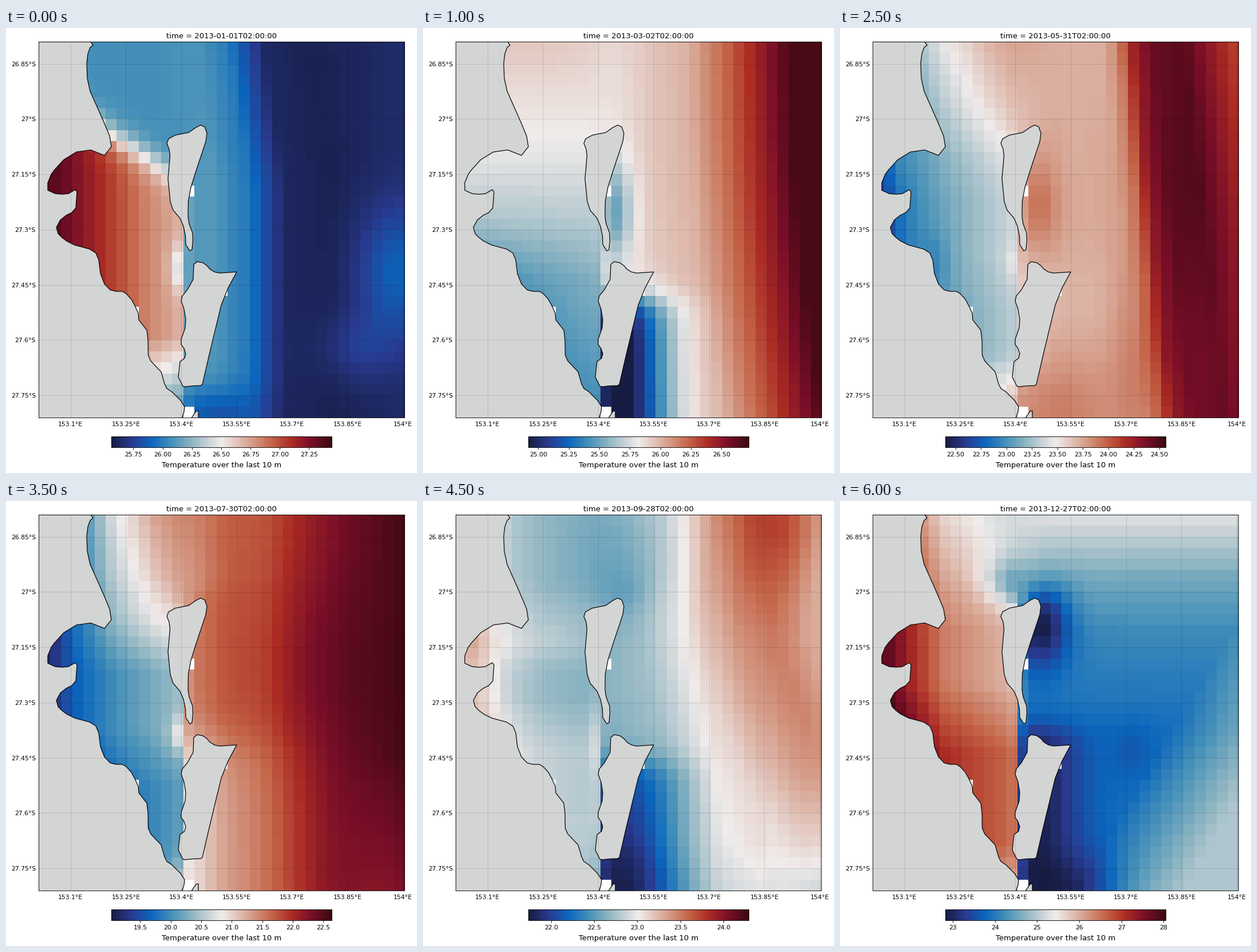
Recreate the animation shown at these times as a matplotlib script. Size 718 px wide and 779 px high, loop 6.5 s.

```python
import numpy as np
import matplotlib.pyplot as plt
from matplotlib.animation import FuncAnimation
from matplotlib.colors import LinearSegmentedColormap
from matplotlib.patches import Polygon
from matplotlib.ticker import MaxNLocator, ScalarFormatter

W, H, DPI = 718, 779, 100
LEFT, RIGHT, TOP, BOTTOM = 57.5, 696, 24.4, 682.4
COLS, ROWS = 33, 34
STEPS, STEP_MS = 13, 500
PX = 72 / DPI  # points per pixel

plt.rcParams["font.family"] = "DejaVu Sans"

# Diverging blue-white-red colours
STOPS = ["#171c42", "#293a8f", "#0b66bd", "#4590b9", "#8eb5c2", "#d2d8db",
         "#e6d2cc", "#d59d89", "#c46548", "#ac2b24", "#780e28", "#3c0911"]
stops = [(i / 11, c) for i, c in enumerate(STOPS)]
stops.insert(6, (0.5, "#f0eceb"))
BALANCE = LinearSegmentedColormap.from_list("balance", stops)

# Cell centres in pixels
X, Y = np.meshgrid(LEFT + (np.arange(COLS) + 0.5) * (RIGHT - LEFT) / COLS,
                   TOP + (np.arange(ROWS) + 0.5) * (BOTTOM - TOP) / ROWS)


def ramp(s, *points):
    return np.interp(s, *zip(*points))


def rise(s, middle, width):
    """Smooth step from 0 to 1; a negative width falls instead."""
    return 1 / (1 + np.exp(-np.clip((s - middle) / width, -50, 50)))


def blob(x, y, rx, ry):
    return np.exp(-((X - x) / rx) ** 2 - ((Y - y) / ry) ** 2)


def upwelling(start, width):
    """Cold water along the outer coast of the southern island."""
    return rise(Y, start, 15) * np.exp(-((X - 340) / width) ** 2)


# Each function returns the bay and the open sea in percent of the range.

def january():
    warm = ramp(X, (90, 95), (200, 76), (250, 67), (310, 60))
    front = rise(Y - 0.6 * (X - 185), 192, 15)
    bay = (27 + (warm - 27) * front - 14 * blob(305, 420, 20, 40)
           - ramp(Y, (540, 0), (680, 35)))
    s = X - ramp(Y, (30, 0), (280, 35))
    sea = ramp(s, (330, 29), (390, 22), (425, 11), (450, 4), (530, 2), (690, 5))
    sea += (13 * blob(680, 430, 70, 120) + 6 * blob(610, 560, 60, 60)
            - 14 * blob(360, 680, 70, 50))
    return bay, sea


def march():
    bay = ramp(Y, (35, 56), (230, 48), (330, 42), (440, 33), (660, 25))
    bay += 0.05 * (X - 250) * rise(Y, 380, 30)
    s = X - 60 * (Y / 680) ** 2
    sea = ramp(s, (330, 52), (400, 57), (460, 60), (530, 73), (600, 88), (640, 98))
    sea -= 54 * upwelling(475, 90) + 20 * blob(335, 320, 30, 90)
    return bay, sea


def may():
    bay = ramp(X, (75, 8), (95, 22), (150, 33), (250, 43), (310, 49))
    bay += ramp(Y, (35, 14), (230, 0)) + ramp(Y, (570, 0), (660, 20))
    bay += 10 * blob(85, 230, 40, 50) - 8 * blob(165, 410, 30, 60)
    s = X - 70 * (Y - 35) / 625
    sea = ramp(s, (330, 56), (400, 53), (460, 53), (485, 62), (510, 84),
               (545, 96), (600, 97), (645, 83), (685, 70))
    sea += (17 * blob(340, 680, 150, 120) + 14 * blob(345, 310, 35, 80)
            + 8 * blob(530, 560, 60, 150) - 5 * blob(620, 560, 60, 200))
    return bay, sea


def july():
    bay = ramp(X, (70, 4), (120, 17), (190, 27), (300, 38))
    bay += (ramp(Y, (35, 1), (200, 0.6), (300, 0))
            * ramp(X, (90, 0), (190, 20), (260, 27)))
    bay += 12 * blob(305, 410, 20, 30) + 12 * blob(310, 670, 30, 40)
    bay -= ramp(Y, (400, 0), (500, 8))
    sea = ramp(X, (330, 69), (380, 74), (450, 75), (530, 85), (600, 92), (690, 98))
    sea += 5 * blob(520, 290, 120, 170)
    sea -= rise(Y, 420, 25) * ramp(X, (330, 16), (450, 5), (560, 0))
    sea -= ramp(Y, (430, 0), (680, 8)) * ramp(X, (560, 0), (660, 1))
    return bay, sea


def august():
    dark = (rise(Y, 272, 12) * rise(Y, 585, -15)
            * rise(X, 300, -10) * rise(X, 125, 10))
    bay = 17 - 11 * dark + 10 * blob(85, 240, 25, 40) + 10 * blob(310, 420, 20, 60)
    d = Y - 35
    s = X - (462 + 0.15 * d + 0.00036 * d ** 2)
    sea = ramp(s, (-300, 22), (-150, 31), (-40, 40), (0, 50), (35, 60),
               (80, 75), (110, 86), (150, 92))
    sea += 6 * blob(640, 50, 45, 80) - ramp(Y, (600, 0), (680, 5))
    sea -= 12 * blob(340, 110, 80, 110) + 14 * blob(340, 660, 70, 90)
    return bay, sea


def october():
    bay = ramp(X, (85, 97), (120, 89), (160, 78), (200, 71), (300, 62))
    bay += ramp(Y, (140, -13), (250, 0), (340, 0), (440, 12), (560, 12), (680, -8))
    s = X - 15 + 30 * np.exp(-((Y - 220) / 130) ** 2)
    sea = ramp(s, (330, 45), (400, 47), (430, 52), (500, 68), (570, 68),
               (620, 57), (650, 46), (690, 30))
    sea += ramp(Y, (250, 0), (500, 14)) * rise(X, 640, 15)
    sea -= 48 * upwelling(458, 110) + 7 * blob(350, 160, 40, 40)
    return bay, sea


def december():
    bay = ramp(X, (85, 94), (120, 84), (180, 69), (300, 59))
    bay += ramp(Y, (35, -14), (130, -7), (230, 0), (320, 0), (440, 13),
                (600, 13), (680, 1))
    bay -= 18 * blob(300, 140, 45, 40)
    sea = ramp(Y, (25, 48), (130, 34), (230, 26), (400, 20))
    sea += ramp(X + 0.6 * Y, (820, 0), (1010, 21))
    sea -= (18 * upwelling(400, 80) + 26 * blob(350, 215, 50, 75)
            + 4 * blob(510, 440, 40, 50) + 9 * blob(430, 680, 70, 60))
    return bay, sea


def blend(bay, sea):
    """Join both waters: softly in the north, sharply behind the islands."""
    w = rise(X, 312, ramp(Y, (130, 30), (200, 3)))
    return np.clip((1 - w) * bay + w * sea, 0, 100) / 100


# (step, lowest, highest temperature, pattern)
KEYS = [
    (0, 25.562, 27.443, january),
    (2, 24.918, 26.723, march),
    (4, 24.086, 25.527, may),
    (7, 19.027, 22.636, july),
    (8, 21.150, 23.739, august),
    (10, 22.320, 24.845, october),
    (12, 22.824, 28.050, december),
]
key_steps, lows, highs, patterns = zip(*KEYS)
fields = [blend(*pattern()) for pattern in patterns]
NO_DATA = [(13, 13), (22, 16), (24, 8), (33, 13)]

MAINLAND = [
    (148, 24), (152, 30), (147, 34), (143, 45), (141, 62), (142, 88),
    (147, 111), (160, 140), (171, 165), (181, 189), (184, 208), (172, 223),
    (148, 213.5), (123, 217), (101, 230.5), (85, 248), (79, 256), (73, 271),
    (73, 284), (86, 290), (98, 291), (109, 290), (121, 283), (124, 287),
    (122, 315), (115, 323), (105, 328), (95, 336), (88, 349), (91, 360),
    (98, 367), (106, 373), (120, 380), (146, 387), (157, 394), (162, 406),
    (165, 430), (172, 448), (182, 458.5), (192, 461), (203, 461), (210, 465),
    (219, 475), (225, 486), (231, 499), (232, 511), (246, 529), (248, 546),
    (248.5, 573), (253, 583), (271, 602), (277, 623), (281, 631), (290, 637),
    (305, 652), (312, 663), (311, 672), (307, 684), (56, 684), (56, 24),
]
NORTH_ISLAND = [
    (340, 170), (347, 173), (351, 184), (349, 199), (344, 214), (332, 250),
    (323, 279), (318.5, 303), (318, 330), (320, 343), (326, 359),
    (326.5, 372), (325, 388), (321, 390), (314, 379), (313.5, 364),
    (310, 347), (304, 333), (292, 319), (287, 304), (283, 264), (286.5, 224),
    (285, 212), (281, 202), (284, 194), (296, 187.5), (319, 183), (332, 174),
]
SOUTH_ISLAND = [
    (334, 409), (344, 411), (351, 416), (356, 422), (364, 427), (373, 429),
    (403, 427), (388, 455), (376, 485), (368, 518), (355, 572), (343, 624),
    (340, 626), (326, 626.5), (313, 628), (309, 627), (301, 611), (304, 584),
    (312, 578), (314, 570), (311, 561), (306, 554), (306, 545), (313, 525),
    (314, 510), (311, 492), (306, 478), (308, 469), (317, 458), (327, 440),
    (328, 414),
]
SPIT = [(323, 684), (332, 671), (336, 670), (336, 684)]


def state(step):
    """Temperature field and its range at a step."""
    low = np.interp(step, key_steps, lows)
    high = np.interp(step, key_steps, highs)
    i = min(np.searchsorted(key_steps, step, side="right") - 1, len(KEYS) - 2)
    t = (step - key_steps[i]) / (key_steps[i + 1] - key_steps[i])
    field = (1 - t) * fields[i] + t * fields[i + 1]
    for cell in NO_DATA:
        field[cell] = np.nan
    return low + field * (high - low), low, high


fig = plt.figure(figsize=(W / DPI, H / DPI), dpi=DPI, facecolor="white")


def pixel_axes(x0, y0, x1, y1):
    return fig.add_axes([x0 / W, 1 - y1 / H, (x1 - x0) / W, (y1 - y0) / H])


ax = pixel_axes(LEFT, TOP, RIGHT, BOTTOM)
temps, low, high = state(0)
image = ax.imshow(temps, cmap=BALANCE, vmin=low, vmax=high, aspect="auto",
                  interpolation="nearest", extent=(LEFT, RIGHT, BOTTOM, TOP))
ax.set(xlim=(LEFT, RIGHT), ylim=(BOTTOM, TOP), xticks=[], yticks=[])
for spine in ax.spines.values():
    spine.set(linewidth=0.9 * PX, zorder=6, snap=False)

for shape in (MAINLAND, NORTH_ISLAND, SOUTH_ISLAND, SPIT):
    ax.add_patch(Polygon(shape, facecolor="#d3d4d4", edgecolor="black",
                         linewidth=1.2 * PX, joinstyle="round", zorder=3))


def label(x, y, text, size=10.9, ha="center"):
    return ax.text(x, y, text, fontsize=size * PX, ha=ha, va="baseline")


grid = dict(color="black", alpha=0.2, linewidth=0.6 * PX, zorder=4)
for i in range(7):
    x, y = 112.6 + 96.77 * i, 62.6 + 96.75 * i
    ax.axvline(x, **grid)
    ax.axhline(y, **grid)
    label(x, 697, f"{round(153.1 + 0.15 * i, 2):g}°E")
    label(52, y + 4, f"{round(26.85 + 0.15 * i, 2):g}°S", ha="right")

title = label(376.5, 18.3, "", 13.1)
label(376.5, 769, "Temperature over the last 10 m", 13.1)

bar = fig.colorbar(image, cax=pixel_axes(184, 714.5, 569, 734),
                   orientation="horizontal",
                   ticks=MaxNLocator(9, steps=[1, 2, 2.5, 5, 10]),
                   format=ScalarFormatter(useOffset=False))
bar.outline.set_linewidth(0.9 * PX)
bar.ax.tick_params(labelsize=10.9 * PX, length=3.8 * PX, width=0.9 * PX,
                   pad=3.8 * PX)


def draw(step):
    temps, low, high = state(step)
    image.set_data(temps)
    image.set_clim(low, high)
    start = np.datetime64("2013-01-01T02:00:00")
    title.set_text(f"time = {start + np.timedelta64(30 * step, 'D')}")
    return image, title


anim = FuncAnimation(fig, draw, frames=STEPS, interval=STEP_MS, repeat=True,
                     repeat_delay=0, blit=False)
plt.show()
```
